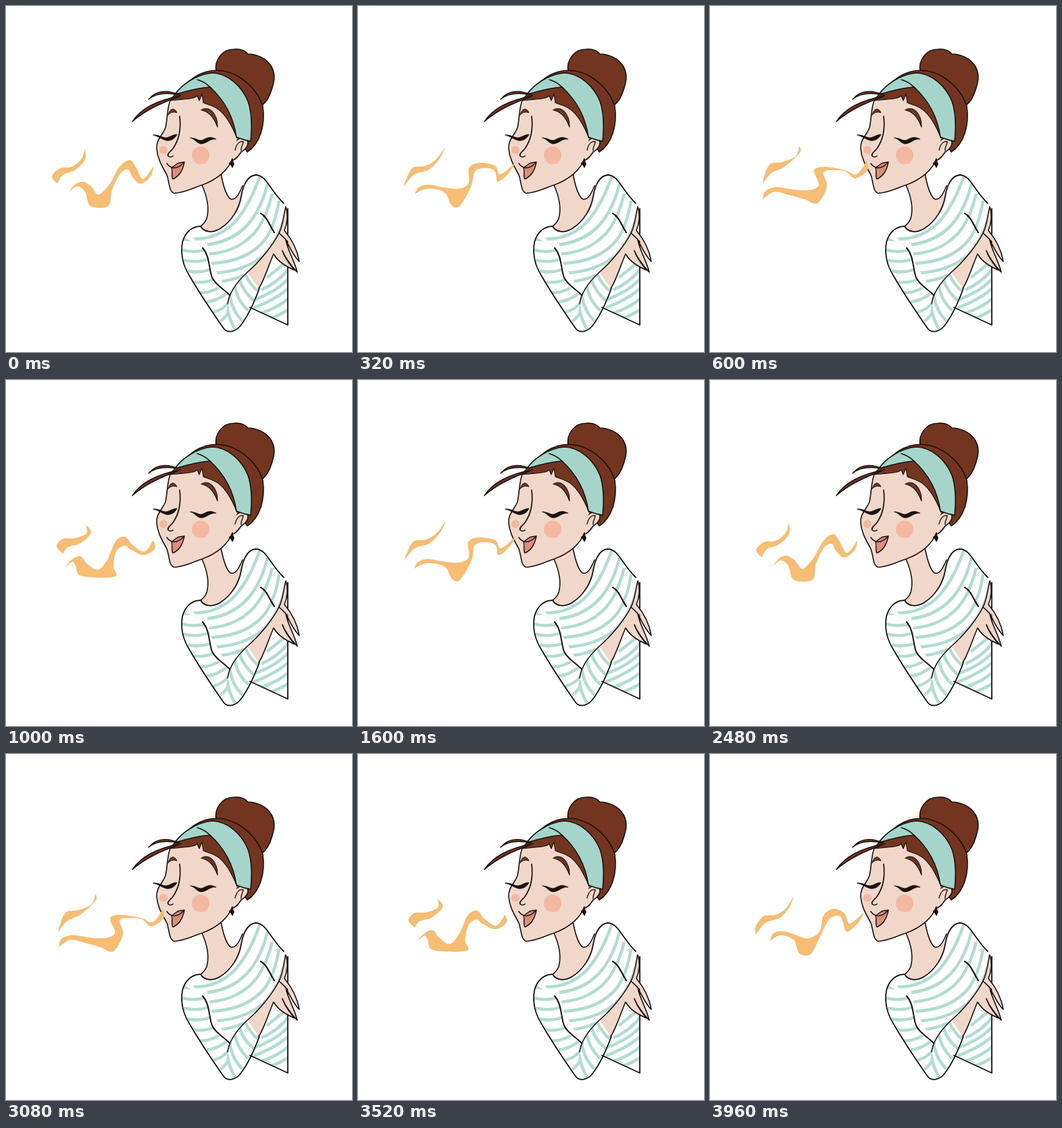
An HTML page with a canvas that plays this animation: 512 px wide and 512 px high, repeating every 4 s.

```html
<!DOCTYPE html>
<html lang="en">
<head>
<meta charset="utf-8">
<title>Savouring a scent</title>
<style>
html, body { margin: 0; width: 100%; height: 100%; overflow: hidden; background: #fff; }
canvas { display: block; width: 100vmin; height: 100vmin; }
</style>
</head>
<body>
<canvas id="stage" width="512" height="512"></canvas>
<script>
const ctx = document.getElementById('stage').getContext('2d');
const LOOP = 4000, STEP = 40, PERIOD = 1250;
const INK = '#17110f', HAIR = '#733520', BAND = '#a5d5ca', SKIN = '#f0d7c9',
      BLUSH = '#f4b8a0', MINT = '#b2dcd1', LIPS = '#d98d7c', SMOKE = '#f6bd74';

function shape(d, fill, stroke, width = 1.6) {
  const p = new Path2D(d);
  if (fill) { ctx.fillStyle = fill; ctx.fill(p); }
  if (stroke) { ctx.strokeStyle = stroke; ctx.lineWidth = width; ctx.stroke(p); }
}
const line = (d, width = 1.6, color = INK) => shape(d, null, color, width);
function dot(x, y, r, color) {
  ctx.fillStyle = color;
  ctx.beginPath();
  ctx.arc(x, y, r, 0, Math.PI * 2);
  ctx.fill();
}

function stripes(clip, width, paths) {
  ctx.save();
  ctx.clip(new Path2D(clip));
  ctx.lineCap = 'butt';
  paths.forEach(d => line(d, width, MINT));
  ctx.restore();
}

function drawSweater() {
  const torso = 'M288 326C293 335 305 336 316 330C334 319 345 300 348 282C351 264 358 251 370 250' +
    'C386 251 390 272 411 292L417 302V472L361 446L331 428L291 358L268 334C274 327 281 327 288 326Z';
  const sleeve = 'M288 326C276 326 265 334 261 350C258 368 263 386 272 400C288 428 306 454 322 477' +
    'C328 485 340 482 347 473C360 456 368 436 375 418L357 394C342 408 330 424 328 441L331 428' +
    'C316 419 304 411 303 394C300 376 299 368 291 358Z';
  const upperArm = 'M260 340L291 358C299 368 300 376 303 394C304 411 316 419 331 428L328 441L330 482H250Z';
  const forearm = 'M357 394C342 408 330 424 328 441L322 477C328 485 340 482 347 473C360 456 368 436 375 418Z';

  shape(torso, '#fff');
  shape(sleeve, '#fff');
  stripes(torso, 4.6, [
    'M266 344Q312 349 340 318Q361 294 376 251',
    'M298 353Q340 348 364 316Q380 293 387 263',
    'M301 367Q348 363 373 329Q386 310 394 278',
    'M304 381Q358 378 384 345Q399 322 404 288',
    'M306 395Q350 394 380 370Q401 350 413 310',
    'M311 408Q334 407 352 398',
    'M386 402Q401 390 419 375',
    'M378 420Q402 410 419 388',
    'M369 434Q402 422 419 402',
    'M366 447Q398 435 419 417',
    'M376 455Q402 447 419 432',
    'M391 462Q407 457 419 448'
  ]);
  ctx.save();
  ctx.clip(new Path2D(sleeve));
  stripes(upperArm, 4.4, [
    'M260 345Q275 347 290 345',
    'M260 361Q280 366 298 360',
    'M263 376Q283 381 301 374',
    'M269 392Q288 396 304 389',
    'M278 408Q294 411 308 404',
    'M286 424Q303 425 317 415',
    'M297 438Q314 436 328 424',
    'M307 453Q321 450 332 436',
    'M317 466Q325 462 331 449'
  ]);
  ctx.restore();
  stripes(forearm, 4.6, [
    'M353 394Q360 412 374 423',
    'M345 402Q349 421 367 436',
    'M338 411Q341 435 359 451',
    'M331 426Q334 451 350 466',
    'M327 444Q330 464 340 480'
  ]);

  line('M288 326C293 335 305 336 316 330C334 319 345 300 348 282C351 264 358 251 370 250' +
       'C386 251 390 272 411 292', 1.8);
  line('M417 300V472L361 446', 1.8);
  line('M288 326C276 326 265 334 261 350C258 368 263 386 272 400C288 428 306 454 322 477' +
       'C328 485 340 482 347 473C360 456 368 436 375 418', 1.8);
  line('M291 358C302 371 300 389 305 402C311 414 324 420 331 428', 2);
  line('M377 307C386 311 390 325 397 335', 2.2);
}

function drawHand() {
  shape('M357 394C378 376 396 352 404 336C410 325 411 308 414 297C418 309 416 323 412 332' +
        'C421 343 431 359 434 378C425 370 419 355 414 346C417 362 427 377 431 394' +
        'C420 382 412 370 409 362C412 373 420 382 427 391C414 385 403 379 396 367' +
        'C389 382 383 404 374 418Z', SKIN);
  line('M328 441C330 424 342 408 357 394C378 376 396 352 404 336C410 325 411 308 414 297' +
       'C418 309 416 323 412 332C421 343 431 359 434 378C425 370 419 355 414 346' +
       'C417 362 427 377 431 394C420 382 412 370 409 362C412 373 420 382 427 391' +
       'C414 385 403 379 396 367C389 382 383 404 374 418');
  line('M404 336C409 341 412 343 417 349');
}

function drawNeck() {
  shape('M286 260C298 280 300 298 298 310C297 319 292 323 288 326C293 335 305 336 316 330' +
        'C334 319 345 300 348 282L350 270C346 280 340 287 333 286C326 280 322 264 318 246Z', SKIN);
  line('M290 265C298 283 300 299 298 310C297 319 292 323 288 326');
  line('M318 248C321 264 326 282 333 286C341 287 346 276 350 266');
}

function drawHead() {
  shape('M311 97C308 80 320 64 337 64C347 63 354 66 358 71C370 71 386 77 393 90' +
        'C400 103 396 115 393 124C390 134 385 142 379 147C370 122 345 101 311 97Z', HAIR, INK);
  shape('M262 120C285 94 310 93 326 97C352 104 373 126 380 148C384 176 376 204 357 216L340 190Z',
        HAIR, INK);

  shape('M340 200C345 194 356 194 358 201C359 210 351 214 348 216C344 222 339 229 332 229L330 200Z',
        SKIN, INK);
  shape('M244 137C238 150 239 168 236 180C232 191 222 198 223 211C224 227 233 240 238 250' +
        'C242 261 241 275 249 277C262 277 275 270 290 265C312 257 329 243 335 226L342 195L318 130L262 125Z',
        SKIN);
  line('M244 137C238 150 239 168 236 180C232 191 222 198 223 211C224 227 233 240 238 250' +
       'C242 261 241 275 249 277C262 277 275 270 290 265C312 257 329 243 335 226');
  line('M339 213C341 204 346 199 351 201C351 205 347 208 348 214', 1.4);
  shape('M335 227L331 233L335 240L338 234Z', INK);
  dot(332, 233, 2, INK);

  shape('M250 130C266 117 290 108 306 118C324 133 338 160 342 196C334 176 325 160 313 152' +
        'C304 146 297 146 292 143L290 130L286 140L283 133C276 139 262 137 243 140Z', HAIR, INK, 1.2);
  shape('M250 131C260 116 281 102 304 99C328 99 349 119 358 141C364 158 364 180 362 200' +
        'C355 199 348 197 341 194C337 167 326 142 302 120C284 121 267 126 250 131Z', BAND, INK);
  line('M283 109C291 111 297 115 303 121');

  shape('M187 171C200 151 225 139 258 133C232 143 207 153 187 171Z', HAIR, INK, 1.4);
  shape('M211 138C222 125 238 123 258 132C240 128 223 128 211 138Z', HAIR, INK, 1.4);
}

function drawFace() {
  dot(288, 221, 13, BLUSH);
  dot(233, 213, 6, BLUSH);
  shape('M240 161C242 152 249 149 253 158C248 156 244 157 240 161Z', HAIR, INK, 1);
  shape('M289 154C301 147 313 159 313 179C308 166 302 157 289 154Z', HAIR, INK, 1.2);
  shape('M218 191C226 190 230 195 237 195C243 194 247 190 253 190C250 197 243 200 237 199' +
        'C230 197 226 193 218 191Z', INK, INK, 0.8);
  shape('M273 195C280 195 284 199 289 199C296 197 300 191 311 197C302 196 298 203 289 204' +
        'C283 204 280 197 273 195Z', INK, INK, 0.8);
  line('M257 163C259 180 257 197 247 211C242 217 238 219 240 222C242 224 245 224 247 222', 1.7);
  shape('M245 239C250 237 253 232 257 232C259 231 261 232 264 231C262 241 257 252 247 256' +
        'C244 252 247 245 245 239Z', LIPS, INK, 1.4);
  line('M238 233C241 238 244 238 246 239C252 241 258 237 263 232', 1.5);
}

// Smoke poses: time within the period, then outline points as x, y pairs.
const poses = [
  { t: 0,
    big: [93,276, 102,264, 114,260, 126,267, 137,279, 153,264, 168,238, 183,228, 193,240, 203,256, 219,236,
          214,252, 199,263, 187,253, 181,242, 169,248, 157,272, 151,296, 125,296, 117,275, 105,267],
    small: [76,263, 68,252, 80,240, 97,238, 111,227, 117,211, 117,227, 102,243, 84,250] },
  { t: 0.168,
    big: [89,277, 93,266, 106,262, 125,267, 144,273, 162,263, 168,239, 183,229, 199,236, 207,251, 228,234,
          220,249, 203,263, 197,250, 192,240, 177,244, 163,270, 149,296, 132,295, 124,275, 104,268],
    small: [68,267, 67,257, 79,240, 97,238, 112,229, 124,210, 118,226, 104,242, 82,250] },
  { t: 0.28,
    big: [83,279, 89,269, 104,265, 128,269, 150,270, 164,262, 163,240, 179,233, 203,237, 212,249, 235,230,
          224,247, 208,259, 204,245, 192,240, 173,244, 168,267, 151,296, 139,294, 128,276, 102,271],
    small: [68,267, 72,257, 82,239, 101,236, 117,226, 130,208, 122,225, 105,242, 84,249] },
  { t: 0.48,
    big: [78,286, 82,274, 98,268, 126,272, 150,272, 161,264, 154,243, 170,238, 200,243, 217,249, 232,229,
          233,243, 215,255, 201,245, 186,243, 168,246, 173,267, 159,292, 140,286, 118,280, 95,275],
    small: [78,263, 80,252, 89,234, 107,231, 127,222, 132,207, 133,217, 110,238, 91,247] },
  { t: 0.8,
    big: [87,278, 97,266, 110,261, 120,272, 136,281, 150,266, 162,239, 176,232, 187,244, 205,254, 218,237,
          220,250, 203,259, 185,251, 175,245, 163,254, 159,276, 161,291, 112,290, 103,275, 98,269],
    small: [84,257, 75,246, 84,235, 102,234, 119,227, 118,214, 126,226, 109,242, 92,247] }
];

// Pose by any index, with time unwrapped across periods.
function poseAt(i) {
  const n = poses.length, turn = Math.floor(i / n), p = poses[i - turn * n];
  return { ...p, t: p.t + turn };
}

// Cubic Hermite blend through the cyclic poses.
function blend(key, phase) {
  let i = poses.length - 1;
  while (poses[i].t > phase) i--;
  const [a, b, c, d] = [i - 1, i, i + 1, i + 2].map(poseAt);
  const h = c.t - b.t, u = (phase - b.t) / h, u2 = u * u, u3 = u2 * u;
  return b[key].map((v, k) => {
    const w = c[key][k];
    const m0 = (w - a[key][k]) / (c.t - a.t) * h;
    const m1 = (d[key][k] - v) / (d.t - b.t) * h;
    return v * (2 * u3 - 3 * u2 + 1) + m0 * (u3 - 2 * u2 + u) + w * (3 * u2 - 2 * u3) + m1 * (u3 - u2);
  });
}

// Smooth curve through the points; both ends stay sharp.
function run(pts) {
  for (let i = 0; i < pts.length - 1; i++) {
    const p = pts[i], q = pts[i + 1], o = pts[i - 1] || p, r = pts[i + 2] || q;
    ctx.bezierCurveTo(p[0] + (q[0] - o[0]) / 6, p[1] + (q[1] - o[1]) / 6,
                      q[0] - (r[0] - p[0]) / 6, q[1] - (r[1] - p[1]) / 6, q[0], q[1]);
  }
}

function wisp(key, tip, phase) {
  const flat = blend(key, phase), pts = [];
  for (let i = 0; i < flat.length; i += 2) pts.push([flat[i], flat[i + 1]]);
  ctx.fillStyle = SMOKE;
  ctx.beginPath();
  ctx.moveTo(...pts[0]);
  run(pts.slice(0, tip + 1));
  run([...pts.slice(tip), pts[0]]);
  ctx.fill();
}

function draw(ms) {
  const time = Math.floor(ms % LOOP / STEP) * STEP;
  const phase = time / PERIOD % 1;
  ctx.fillStyle = '#fff';
  ctx.fillRect(0, 0, 512, 512);
  ctx.lineCap = ctx.lineJoin = 'round';
  drawNeck();
  drawSweater();
  drawHand();
  drawHead();
  drawFace();
  wisp('big', 10, phase);
  wisp('small', 5, phase);
}

const start = performance.now();
function tick() {
  draw(performance.now() - start);
  requestAnimationFrame(tick);
}
tick();
</script>
</body>
</html>
```
